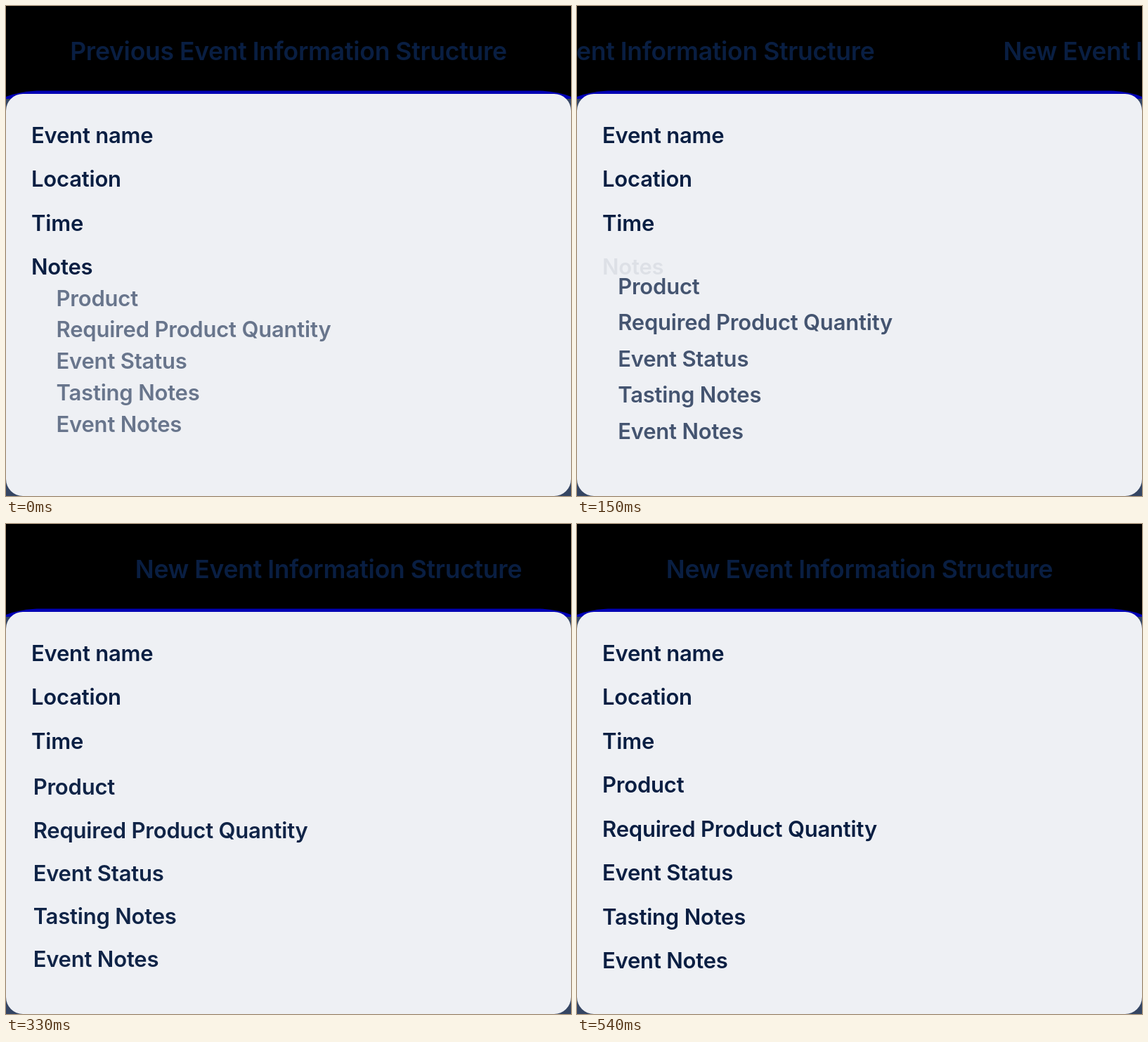
An HTML page for the animation above (1800 ms loop, 804 by 697 pixels).

```html
<!DOCTYPE html>
<html lang="en">
<head>
<meta charset="utf-8">
<title>Event information structure</title>
<style>
  html, body { margin: 0; width: 100%; height: 100%; overflow: hidden; background: #000; }
  svg { display: block; width: 804px; height: 697px; }
  text { font: 600 31px Inter, "Open Sans", sans-serif; letter-spacing: -.2px; fill: #091e42; }
  #titles text { font-size: 35.5px; letter-spacing: -.25px; word-spacing: -.5px; text-anchor: middle; }
</style>
</head>
<body>
<svg viewBox="0 0 804 697">
  <path d="M0 129Q18 122 44 120.5H760Q786 122 804 129V134H0Z" fill="#0000b4"/>
  <path d="M0 132H804V697H0Z" fill="#344563"/>
  <rect y="125" width="804" height="572" rx="24" fill="#eef0f4"/>
  <g id="titles">
    <text x="402" y="76.5">Previous Event Information Structure</text>
    <text x="1171" y="76.5">New Event Information Structure</text>
  </g>
  <g id="rows"></g>
</svg>
<script>
const LOOP = 1800, STEP = 30;
const LEFT = 36, TOP = 194.6, PITCH = 62.5;
const titles = document.getElementById('titles');
const rows = document.getElementById('rows');

function addRow(label, i) {
  const el = document.createElementNS('http://www.w3.org/2000/svg', 'text');
  el.textContent = label;
  el.setAttribute('x', LEFT);
  el.setAttribute('y', TOP + PITCH * i);
  return rows.appendChild(el);
}

const notes = ['Event name', 'Location', 'Time', 'Notes'].map(addRow)[3];
const details = ['Product', 'Required Product Quantity', 'Event Status', 'Tasting Notes', 'Event Notes']
  .map((label, i) => addRow(label, i + 3));

// Easing: monotone cubic through [ms, progress] points
const keys = [[0, 0], [60, .097], [150, .376], [210, .68], [330, .926], [450, .9896], [540, 1]];
const slopes = keys.slice(1).map(([t, p], i) => (p - keys[i][1]) / (t - keys[i][0]));
const tangents = keys.map((_, i) => {
  const a = slopes[i - 1], b = slopes[i];
  return a && b ? 2 * a * b / (a + b) : 0;
});

function progress(t) {
  const i = keys.findIndex(k => k[0] > t) - 1;
  if (i < 0) return 1;
  const [t0, p0] = keys[i], [t1, p1] = keys[i + 1];
  const h = t1 - t0, u = (t - t0) / h, v = 1 - u;
  return p0 * v * v * (1 + 2 * u) + p1 * u * u * (3 - 2 * u)
    + h * u * v * (tangents[i] * v - tangents[i + 1] * u);
}

function draw(now) {
  const p = progress(Math.floor(now % LOOP / STEP) * STEP);
  const rest = 1 - p;
  titles.setAttribute('transform', `translate(${-769 * p} 0)`);
  notes.setAttribute('opacity', 1 - Math.min(1, p / .4) ** 1.2);
  details.forEach((el, i) => {
    // Start indented and tightly spaced, end in line with the other rows
    el.setAttribute('transform', `translate(${35.5 * rest} ${(44.7 - 17.8 * i) * rest})`);
    el.setAttribute('opacity', 1 - .42 * rest);
  });
}

const start = performance.now();
function tick() {
  draw(performance.now() - start);
  requestAnimationFrame(tick);
}
tick();
</script>
</body>
</html>
```
